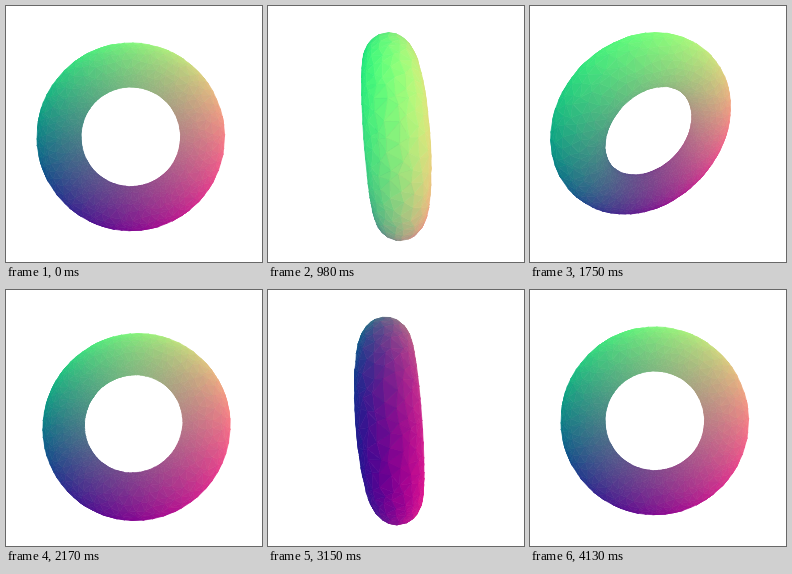
Recreate the animation shown at these times as an HTML page with a canvas. Size 256 by 256 pixels, loop 4.2 s.

```html
<!DOCTYPE html>
<html lang="en">
<head>
<meta charset="utf-8">
<title>Turning torus</title>
<style>
html, body { margin: 0; width: 100%; height: 100%; overflow: hidden; background: #fff; }
canvas { display: block; width: 256px; height: 256px; }
</style>
</head>
<body>
<canvas id="stage" width="256" height="256"></canvas>
<script>
const ctx = document.getElementById('stage').getContext('2d');

const RING = 0.775, TUBE = 0.225;      // outer radius is 1
const EYE = 2.1, FOCAL = 192.5;        // perspective camera
const CX = 124.8, CY = 130.8;
const STEP = 70, FRAMES = 60, TAU = Math.PI * 2;
const SWING = 1.12;                    // largest camera elevation
const NU = 64, NV = 22;

let seed = 11;
const rand = () => (seed = (seed * 16807) % 2147483647) / 2147483647;
const jitter = () => (rand() - 0.5) * 0.62;

// Torus with an irregular triangle mesh
const points = [], faces = [];
for (let i = 0; i < NU; i++) {
  for (let j = 0; j < NV; j++) {
    const u = (i + (j % 2) / 2 + jitter()) / NU * TAU;
    const v = (j + jitter()) / NV * TAU;
    const rho = RING + TUBE * Math.cos(v);
    points.push([rho * Math.cos(u), rho * Math.sin(u), TUBE * Math.sin(v)]);
  }
}
const at = (i, j) => {
  const wrap = j === NV ? 0 : j;
  return ((i + NU) % NU) * NV + wrap;
};
for (let i = 0; i < NU; i++) {
  for (let j = 0; j < NV; j++) {
    const a = at(i, j), b = at(i + 1, j), c = at(i + 1, j + 1), d = at(i, j + 1);
    if (j % 2) faces.push([a, b, c], [a, c, d]);
    else faces.push([a, b, d], [b, c, d]);
  }
}

const mean = (f, list, k) => (list[f[0]][k] + list[f[1]][k] + list[f[2]][k]) / 3;
const byte = v => Math.round(255 * Math.min(1, Math.max(0, v)));

function draw(turn) {
  const ca = Math.cos(turn), sa = Math.sin(turn);
  const el = SWING * sa, ce = Math.cos(el), se = Math.sin(el);
  const reach = RING * Math.abs(ca) + TUBE;

  // spin about the upright axis, then tilt towards the camera
  const spun = points.map(([x, y, z]) => [x * ca - z * sa, y, x * sa + z * ca]);
  const seen = spun.map(([x, y, z]) => {
    const up = y * ce - z * se, near = y * se + z * ce;
    const k = FOCAL / (EYE - near);
    return [CX + x * k, CY - up * k, near];
  });

  const visible = [];
  for (const f of faces) {
    const [a, b, c] = f.map(i => seen[i]);
    const area = (b[0] - a[0]) * (c[1] - a[1]) - (b[1] - a[1]) * (c[0] - a[0]);
    if (area < 0) visible.push({ f, depth: mean(f, seen, 2) });
  }
  visible.sort((p, q) => p.depth - q.depth);

  ctx.fillStyle = '#fff';
  ctx.fillRect(0, 0, 256, 256);
  ctx.lineWidth = 0.7;
  ctx.lineJoin = 'round';
  for (const { f } of visible) {
    const rho = Math.hypot(mean(f, points, 0), mean(f, points, 1));
    const tone = Math.pow(rho, 0.4) / 2;
    const x = mean(f, spun, 0) / reach, y = mean(f, spun, 1);
    const color = `rgb(${byte(0.5 + x * tone)},${byte(0.5 + y * tone)},${byte(0.525 - y * 0.045)})`;
    ctx.fillStyle = ctx.strokeStyle = color;
    ctx.beginPath();
    for (const i of f) ctx.lineTo(seen[i][0], seen[i][1]);
    ctx.closePath();
    ctx.fill();
    ctx.stroke();
  }
}

const start = performance.now();
let shown = -1;
function tick() {
  const frame = Math.floor((performance.now() - start) / STEP) % FRAMES;
  if (frame !== shown) {
    shown = frame;
    draw(frame / (FRAMES - 1) * TAU);
  }
  requestAnimationFrame(tick);
}
tick();
</script>
</body>
</html>
```
